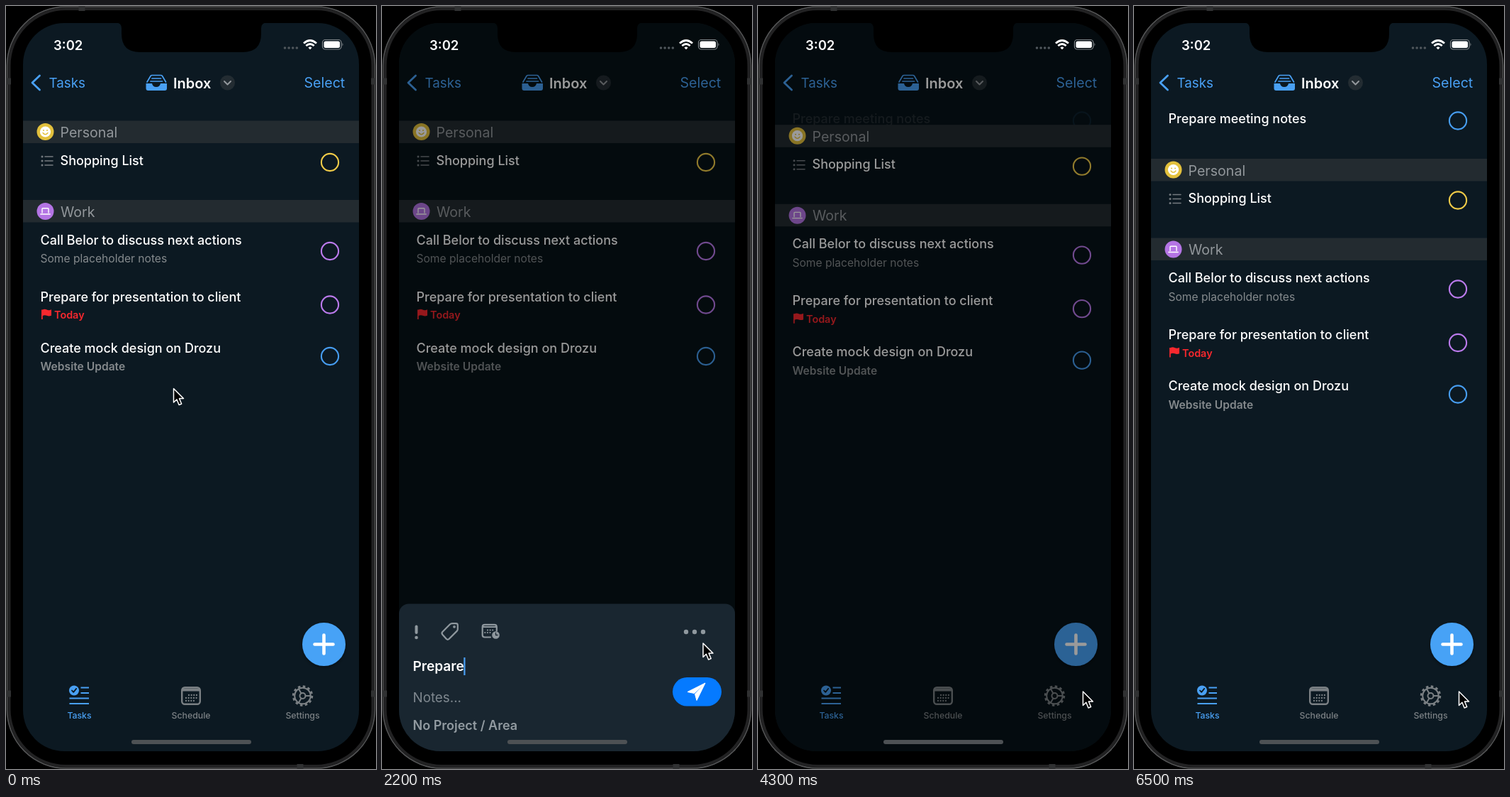
An HTML page for the animation above (6.6 s loop, 522 px wide and 1074 px high).

```html
<!DOCTYPE html>
<html lang="en">
<head>
<meta charset="utf-8">
<title>Task inbox</title>
<style>
  html, body { margin: 0; height: 100%; background: #000; overflow: hidden; }
  svg { display: block; width: 522px; height: 1074px; font-family: Inter, sans-serif; }
  text { white-space: pre; }
  .line { fill: none; stroke-linecap: round; stroke-linejoin: round; }
  .nav { font-size: 19.6px; fill: #49a0f4; }
  .head { font-size: 19.6px; fill: #92979b; }
  .title { font-size: 18px; font-weight: 500; fill: #fff; }
  .sub { font-size: 15.6px; fill: #858a8d; }
  .tab { font-size: 12.3px; font-weight: 500; text-anchor: middle; fill: #7b8084; }
  .ring { fill: none; stroke-width: 2.1; }
  .bold { font-weight: 600; }
</style>
</head>
<body>
<svg viewBox="0 0 522 1074">
  <defs>
    <clipPath id="screen"><rect x="24" y="24" width="474" height="1025" rx="58"/></clipPath>
    <filter id="shadow" x="-30%" y="-30%" width="160%" height="160%">
      <feDropShadow dx="0" dy="2" stdDeviation="2.5" flood-opacity=".4"/>
    </filter>
  </defs>

  <!-- phone body -->
  <rect x="4.500" y="4" width="513" height="1066" rx="80" fill="#000" stroke="#222223" stroke-width="4"/>
  <rect x="1.500" y="1" width="519" height="1072" rx="83" fill="none" stroke="#555657" stroke-width="1.6"/>
  <path d="M0 106h7M515 106h7M0 968h7M515 968h7M107 0v7M415 1067v7" stroke="#303132" stroke-width="9"/>

  <g clip-path="url(#screen)">
    <rect x="24" y="24" width="474" height="1025" fill="#0c1922"/>
    <rect id="backDim" x="24" y="24" width="474" height="1025" fill="#000a0a"/>

    <!-- navigation bar -->
    <path class="line" d="M47.500 98L37 108l10.500 10" stroke="#49a0f4" stroke-width="2.8"/>
    <text class="nav" x="60.500" y="115" style="font-size:18.800px">Tasks</text>
    <g fill="#49a0f4">
      <path d="M197.500 109h8.500q1 5 6 5t6-5h9v7q0 3-3 3h-23.500q-3 0-3-3z"/>
      <path class="line" d="M199 107l5-8.500q.7-1 2-1h12.500q1.300 0 2 1l5 8.500M206 102h12.500M204 106h16.500" stroke="#49a0f4" stroke-width="1.7"/>
    </g>
    <text class="nav bold" x="236" y="115.500" style="font-size:20px;fill:#fff">Inbox</text>
    <circle cx="312.500" cy="108" r="10.500" fill="#232c32"/>
    <path class="line" d="M308 106l4.500 4.500 4.500-4.500" stroke="#92979b" stroke-width="2"/>
    <text class="nav" x="420.500" y="115">Select</text>

    <!-- added row -->
    <rect id="glow" x="30.500" y="135" width="461.500" height="53" rx="10" fill="#b6a75f"/>
    <g id="newRow">
      <text class="title" x="48.500" y="165">Prepare meeting notes</text>
      <circle class="ring" cx="457" cy="161.500" r="12.100" stroke="#479df0"/>
    </g>

    <!-- existing rows -->
    <g id="list">
      <path d="M24 161.500h474v31.500H24zM24 273h474v31.500H24z" fill="#232b30"/>
      <circle cx="55.500" cy="177" r="12" fill="#e3c03c"/>
      <circle cx="55.500" cy="177" r="7.600" fill="#fff"/>
      <circle cx="53" cy="175" r="1" fill="#e3c03c"/>
      <circle cx="58" cy="175" r="1" fill="#e3c03c"/>
      <path class="line" d="M52 178.500q3.500 4.500 7 0" stroke="#e3c03c" stroke-width="1.400"/>
      <text class="head" x="76.500" y="185">Personal</text>
      <path class="line" d="M55 212h11M55 218h11M55 224h11" stroke="#757b80" stroke-width="1.500"/>
      <circle cx="51" cy="212" r="1.500" fill="#757b80"/>
      <circle cx="51" cy="218" r="1.500" fill="#757b80"/>
      <circle cx="51" cy="224" r="1.500" fill="#757b80"/>
      <text class="title" x="76.500" y="223.500">Shopping List</text>
      <circle class="ring" cx="457" cy="220" r="12.100" stroke="#f0cb48"/>

      <circle cx="55.500" cy="289" r="12" fill="#b474e4"/>
      <path class="line" d="M51 291v-5.500q0-.8.800-.8h7.400q.8 0 .8.800v5.500M48.800 293h13.400" stroke="#fff" stroke-width="1.400"/>
      <text class="head" x="77" y="296.500">Work</text>

      <text class="title" x="48.500" y="335.500">Call Belor to discuss next actions</text>
      <text class="sub" x="48.500" y="361">Some placeholder notes</text>
      <circle class="ring" cx="457" cy="345" r="12.100" stroke="#bb7aec"/>

      <text class="title" x="48.500" y="415.500">Prepare for presentation to client</text>
      <path d="M50 427.500h1.500q3-1.500 6 0t6.500-.3v8.600q-3.500 1.200-6.500 0t-5.800.2v5H50z" fill="#f8282e"/>
      <text class="sub bold" x="68" y="440" style="font-size:14.400px;fill:#f8282e">Today</text>
      <circle class="ring" cx="457" cy="420.500" r="12.100" stroke="#bb7aec"/>

      <text class="title" x="48.500" y="487.500">Create mock design on Drozu</text>
      <text class="sub bold" x="48.500" y="513">Website Update</text>
      <circle class="ring" cx="457" cy="493" r="12.100" stroke="#479df0"/>
    </g>

    <!-- add button and tab bar -->
    <circle cx="448.500" cy="898.500" r="30.500" fill="#47a2f6" filter="url(#shadow)"/>
    <path class="line" d="M448.500 885.500v26M435.500 898.500h26" stroke="#fff" stroke-width="4.600"/>

    <circle cx="96" cy="963.500" r="7" fill="#49a0f4"/>
    <path class="line" d="M93 963.500l2.200 2.400 4-5" stroke="#0c1922" stroke-width="1.800"/>
    <path d="M105.500 959.500h11.500M105.500 967h11.500M89.500 974.500h27.500M89.500 982h27.500" stroke="#49a0f4" stroke-width="2.200"/>
    <text class="tab" x="103.500" y="1003" style="fill:#49a0f4">Tasks</text>

    <rect class="line" x="248.200" y="959.200" width="25.600" height="23.600" rx="4" stroke="#7b8084" stroke-width="2.400"/>
    <path d="M248 962.500h26" stroke="#7b8084" stroke-width="4"/>
    <path class="line" d="M258 970h11M254 974h15M254 978h11" stroke="#7b8084" stroke-width="2.300" stroke-dasharray="0 3.650"/>
    <text class="tab" x="261" y="1003">Schedule</text>

    <g class="line" stroke="#7b8084" stroke-width="2" transform="translate(418.500 971)">
      <circle r="11.300"/>
      <circle r="13.200" stroke-width="3" stroke-linecap="butt" stroke-dasharray="3.450 3.450"/>
      <circle r="4"/>
      <path d="M4 0h7M-2 -3.500l-3.500 -6M-2 3.500l-3.500 6"/>
    </g>
    <text class="tab" x="418.500" y="1003">Settings</text>

    <rect id="dim" x="24" y="24" width="474" height="1025"/>

    <!-- composer -->
    <g id="sheet">
      <g id="sheetTop">
        <rect x="24" y="841.500" width="474" height="260" rx="14" fill="#192630"/>
        <g class="line" stroke="#8f989e" stroke-width="2.200">
          <path d="M48.500 873.500v8.500" stroke-width="4"/>
          <circle cx="48.500" cy="889" r="1.200" fill="#8f989e"/>
          <path d="M85.300 881L96 870.300q1.200-1.200 3-1.200h5.500q2.300 0 2.300 2.300v5.500q0 1.800-1.200 3L94.500 891q-1.800 1.600-3.600 0l-5.600-6.300q-1.600-1.900 0-3.700z"/>
          <circle cx="102" cy="873.800" r=".8"/>
          <path d="M153 888.500h-8q-3.300 0-3.300-3.300v-11q0-3.300 3.300-3.300h13.500q3.300 0 3.300 3.300v5.500M142 874h19.500"/>
          <path d="M149 878.500h9.500M145.300 882h8.500" stroke-dasharray="0 3.600"/>
          <circle cx="160.500" cy="885.500" r="4.600" fill="#8f989e" stroke-width="1.500"/>
          <path d="M160.500 882.500v3h2.500" stroke="#192630" stroke-width="1.300"/>
        </g>
        <g fill="#8f989e">
          <circle cx="429" cy="881" r="3.200"/>
          <circle cx="441" cy="881" r="3.200"/>
          <circle cx="453" cy="881" r="3.200"/>
        </g>
        <text id="typed" class="bold" x="43.500" y="936" font-size="19.100" fill="#fff"></text>
        <rect id="caret" y="917" width="2.200" height="25" fill="#4a9ff3"/>
      </g>
      <text id="notes" x="43.500" y="979.500" font-size="18.800" fill="#7f888f">Notes...</text>
      <text class="bold" x="43.500" y="1019" font-size="18" fill="#929ba1">No Project / Area</text>
      <g id="send">
        <rect id="sendPill" x="410" y="945" width="69" height="40.500" rx="20.200"/>
        <path d="M456 953l-25 12.500 9.500 2zM456 953l-14.500 15.500 2.500 9z" fill="#fff" stroke="#fff" stroke-linejoin="round"/>
      </g>
    </g>
  </g>

  <!-- notch, status bar and home indicator -->
  <path d="M155 23.500q8 0 8 8V39q0 26 26 26h145q26 0 26-26v-7.500q0-8 8-8z"/>
  <text class="bold" x="67" y="61.500" font-size="18.500" fill="#fff">3:02</text>
  <path class="line" d="M393.500 59h18" stroke="#50575c" stroke-width="3.600" stroke-dasharray="0 5.600"/>
  <g class="line" stroke="#fff" stroke-width="2.700" style="stroke-linecap:butt">
    <path d="M420 52.500q9-8 18 0M423.300 56q5.700-5 11.400 0"/>
    <path d="M427 58.600q2-1.500 4 0l-2 2.200z" fill="#fff" stroke-width="1"/>
  </g>
  <rect x="446.500" y="47.500" width="26.500" height="13.500" rx="4" fill="none" stroke="#80868a" stroke-width="1.200"/>
  <rect x="448.500" y="49.500" width="22.500" height="9.500" rx="2.500" fill="#fff"/>
  <path d="M474.500 52q2 2.200 0 4.500z" fill="#80868a"/>
  <rect x="177" y="1033" width="169" height="6" rx="3" fill="#4d5154"/>

  <path id="pointer" d="M0 0v19.500l4.400-4.200 3.200 7.700 3.600-1.500-3.200-7.500h6z" stroke="#fff" stroke-width="1.500" stroke-linejoin="round"/>
</svg>

<script>
const LOOP = 6600;
const TASK = 'Prepare meeting notes';
const $ = id => document.getElementById(id);

// Progress from 0 to 1 between two times
const span = (t, from, to) => Math.min(1, Math.max(0, (t - from) / (to - from)));
const smooth = p => p * p * (3 - 2 * p);
const easeOut = p => 1 - (1 - p) ** 3;
const mix = (a, b, p) => a + (b - a) * p;
const move = (id, x, y) => $(id).setAttribute('transform', `translate(${x} ${y})`);
const fade = (id, value) => $(id).setAttribute('opacity', value);

function draw(t) {
  const toAdd = smooth(span(t, 40, 200));
  const toSend = smooth(span(t, 3650, 4000));
  move('pointer',
    mix(mix(236.5, 453, toAdd), 458.5, toSend),
    mix(mix(538.5, 897, toAdd), 965, toSend));

  const opened = easeOut(span(t, 550, 1050));
  const closed = smooth(span(t, 4130, 4290));
  move('sheet', 0, 235 * (1 - opened + closed));

  const shade = smooth(span(t, 550, 1000)) - smooth(span(t, 4280, 4750));
  fade('dim', 0.4 * shade);
  fade('backDim', 0.4 * shade);

  // One letter every 100 ms
  const count = Math.min(TASK.length, Math.max(0, Math.floor((t - 1500) / 100)));
  const grown = smooth(span(t, 1590, 1800));
  $('typed').textContent = TASK.slice(0, count);
  $('caret').setAttribute('x', 43 + $('typed').getComputedTextLength());
  move('sheetTop', 0, 14.5 * (1 - grown));
  move('send', 0, 7.5 * (1 - grown));
  fade('notes', grown);
  $('sendPill').setAttribute('fill', count ? '#057aff' : '#6c6d6e');

  const inserted = smooth(span(t, 4200, 4700));
  move('list', 0, 53.5 * inserted);
  fade('newRow', inserted);
  fade('glow', smooth(span(t, 4760, 5500)) - smooth(span(t, 5940, 6500)));
}

const start = performance.now();
function tick() {
  draw((performance.now() - start) % LOOP);
  requestAnimationFrame(tick);
}
tick();
</script>
</body>
</html>
```
